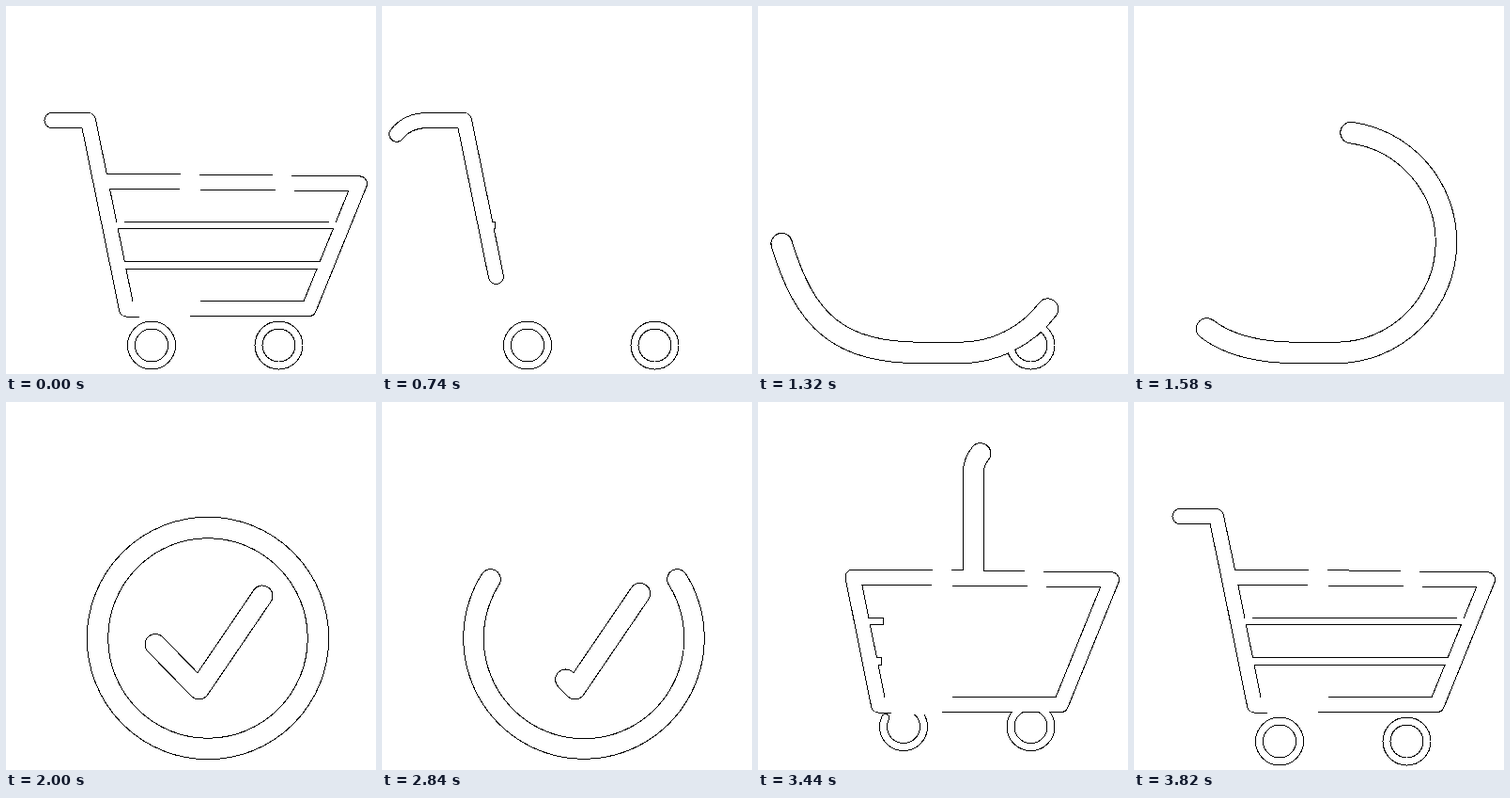
An HTML page that plays this animation: 394 px wide and 391 px high, repeating every 3840 ms.

```html
<!DOCTYPE html>
<html lang="en">
<head>
<meta charset="utf-8">
<title>Cart to check</title>
<style>
html, body { margin: 0; width: 100%; height: 100%; overflow: hidden; background: #fff; }
svg { display: block; width: 100vw; height: 100vh; }
path { fill: none; stroke-linejoin: round; stroke-linecap: round; }
#ink { stroke: #000; }
#body { stroke: #fff; }
#gaps rect { fill: #fff; }
</style>
</head>
<body>
<svg viewBox="0 0 394 391" shape-rendering="crispEdges">
  <g id="ink"></g>
  <g id="body"></g>
  <g id="gaps"></g>
</svg>
<script>
const NS = 'http://www.w3.org/2000/svg';
const LOOP = 3840;
const $ = id => document.getElementById(id);
const add = (parent, tag) => parent.appendChild(document.createElementNS(NS, tag));
const lerp = (a, b, k) => a + (b - a) * k;
const clamp = k => Math.max(0, Math.min(1, k));
const ramp = (t, a, b) => clamp((t - a) / (b - a));
const smooth = k => k * k * (3 - 2 * k);

function measure(d) {
  const p = document.createElementNS(NS, 'path');
  p.setAttribute('d', d);
  return p.getTotalLength();
}

// Monotone cubic through [time, value] keys, at rest at both ends.
function track(keys) {
  const n = keys.length - 1;
  const slope = i => (keys[i + 1][1] - keys[i][1]) / (keys[i + 1][0] - keys[i][0]);
  const tan = keys.map((k, i) => {
    if (i === 0 || i === n) return 0;
    const a = slope(i - 1), b = slope(i);
    return a * b > 0 ? 2 * a * b / (a + b) : 0;
  });
  return t => {
    if (t <= keys[0][0]) return keys[0][1];
    if (t >= keys[n][0]) return keys[n][1];
    let i = 0;
    while (t > keys[i + 1][0]) i++;
    const [t0, v0] = keys[i], [t1, v1] = keys[i + 1];
    const h = t1 - t0, u = (t - t0) / h, w = 1 - u;
    return v0 * (1 + 2 * u) * w * w + v1 * u * u * (3 - 2 * u)
      + h * u * w * (tan[i] * w - tan[i + 1] * u);
  };
}

// A tube is a dark stroke below a slightly thinner white one, so crossing tubes merge.
function tube(d) {
  const pair = [add($('ink'), 'path'), add($('body'), 'path')];
  const all = (k, v) => pair.forEach(p => p.setAttribute(k, v));
  if (d) all('d', d);
  return {
    pair,
    path: v => all('d', v),
    show: on => all('visibility', on ? 'visible' : 'hidden'),
    width(w) {
      pair[0].setAttribute('stroke-width', w + 1);
      pair[1].setAttribute('stroke-width', w - 1);
    },
    trim(a, b) {
      this.show(b - a > 0.2);
      all('stroke-dasharray', `${Math.max(b - a, 0.1)} 9999`);
      all('stroke-dashoffset', -a);
    }
  };
}

const TL = [101, 186.04], TR = [376.5, 188.82], BR = [322.5, 321.6], BL = [128.5, 322.1];

// Cart outline, handle, sweep below and the ring, as one line.
const cartPath = `M${TL} L${TR} L${BR} L${BL} L87.5 121.5 H49`;
const lipPath = cartPath + ' C33 121.5 23 127 16 136';
const sidePath = lipPath + ' C8 146 8 195 25 252';
const lowPath = sidePath + ' C50 335 85 368.5 175 368.5 H215';
const ringPath = lowPath + ' A117.5 117.5 0 0 0 215 133.5 A117.5 117.5 0 0 0 215 368.5';
const [hand, lip, side, low, full] = [cartPath, lipPath, sidePath, lowPath, ringPath].map(measure);
const edge = measure(`M${TL} L${TR} L${BR}`);
const base = measure(`M${TL} L${TR} L${BR} L${BL}`);

const snake = tube(ringPath);
const snakeHead = track([[560, hand], [740, lip], [1100, low - 113], [1320, low + 107],
  [1640, low + 408], [1990, full]]);
const snakeTail = track([[20, 0], [560, edge + 21], [740, base + 34.5], [1320, side],
  [1640, low - 121], [1990, low]]);

// The tick flies up, over and down into the basket.
const tickPath = 'M159 257.5 L205.5 305 L273 206';
const overPath = tickPath + ' C300 166 318 130 318 95 C318 55 290 41.5 268 41.5 C250 41.5 229 52 229 78';
const dropPath = overPath + ' V180';
const [tickLen, overLen, dropLen] = [tickPath, overPath, dropPath].map(measure);
const tick = tube(dropPath);
const tickDraw = track([[1620, 0], [1980, tickLen]]);
const tickHead = track([[2700, tickLen], [2840, tickLen + 3], [3220, dropLen - 50], [3440, dropLen + 70]]);
const tickTail = track([[2700, 0], [2840, 52], [3440, overLen - 26], [3660, dropLen]]);

const gripPath = `M229 187 L${TL} L87.5 121.5 H49`;
const gripLen = measure(gripPath);
const grip = tube(gripPath);
const gripHead = track([[3300, 0], [3440, 70], [3760, gripLen]]);

const bin = tube();
const lids = [tube(), tube()];

const bars = [
  { y: 232.75, x0: 112, out: [[20, 356], [560, 215], [740, 120], [770, 112]], back: [[3390, 113], [3440, 132], [3750, 356]] },
  { y: 275.5, x0: 120, out: [[20, 338], [540, 190], [700, 120]], back: [[3390, 119], [3440, 131], [3750, 338]] }
].map(b => {
  const line = tube();
  line.pair.forEach(p => p.style.strokeLinecap = 'butt');
  line.width(7.5);
  return { ...b, line, out: track(b.out), back: track(b.back) };
});

const R = 21.5;
const wheels = [
  { x: 155, gone: [1120, 1300], come: [3230, 3490] },
  { x: 290.5, gone: [1325, 1500], come: [3190, 3430] }
].map(w => {
  const line = tube(`M${w.x} ${360.5 - R} a${R} ${R} 0 0 1 0 ${2 * R} a${R} ${R} 0 0 1 0 ${-2 * R}`);
  line.width(8);
  return { ...w, line };
});
const around = 2 * Math.PI * R + 1;
const wheelLift = track([[3190, -26], [3440, -15.5], [3660, 0]]);

function gap(x0, x1, y, h) {
  const r = add($('gaps'), 'rect');
  Object.entries({ x: x0, y, width: x1 - x0, height: h }).forEach(([k, v]) => r.setAttribute(k, v));
  return r;
}
const rimGaps = [gap(186, 206, 177, 4), gap(284, 304, 178, 4), gap(185, 207, 193, 4),
  gap(287, 307, 194, 4), gap(142, 196, 328, 4), gap(135, 207, 312, 4)];
const barGaps = [gap(118, 126, 228, 3), gap(344, 351, 228, 3)];
const toggle = (list, on) => list.forEach(e => e.setAttribute('visibility', on ? 'visible' : 'hidden'));

// Point on the open basket: left side, floor, right side.
function binPoint(u) {
  const a = 0.29, b = 0.7;
  const mix = (p, q, k) => [lerp(p[0], q[0], k), lerp(p[1], q[1], k)];
  if (u < a) return mix(TL, BL, u / a);
  if (u < b) return mix(BL, BR, (u - a) / (b - a));
  return mix(BR, TR, (u - b) / (1 - b));
}

function drawBin(t) {
  const half = lerp(180, 122.2, Math.pow(ramp(t, 2690, 2840), 1.3)) * Math.PI / 180;
  const k = smooth(ramp(t, 2840, 3200));
  const pts = [];
  for (let i = 0; i <= 100; i++) {
    const u = i / 100, ang = Math.PI / 2 + half * (1 - 2 * u), q = binPoint(u);
    pts.push([lerp(215 + 117.5 * Math.cos(ang), q[0], k), lerp(251 + 117.5 * Math.sin(ang), q[1], k)]);
  }
  bin.path('M' + pts.map(p => p.map(v => v.toFixed(2)).join(' ')).join('L'));
  const w = lerp(lerp(22.5, 21.5, ramp(t, 2700, 2840)), 16, k);
  bin.width(w);
  const close = smooth(ramp(t, 2980, 3250)) / 2;
  lids.forEach((lid, i) => {
    const p = pts[i ? 100 : 0], q = pts[i ? 0 : 100];
    lid.path(`M${p} L${lerp(p[0], q[0], close)} ${lerp(p[1], q[1], close)}`);
    lid.width(w);
    lid.show(close > 0);
  });
}

function render(t) {
  const late = t >= 2700;

  if (late) snake.show(false);
  else {
    snake.width(lerp(16, 22.5, smooth(ramp(t, 760, 1250))));
    snake.trim(snakeTail(t), snakeHead(t));
  }

  bin.show(late);
  if (late) drawBin(t);
  else lids.forEach(lid => lid.show(false));

  tick.width(22);
  if (late) tick.trim(tickTail(t), Math.min(dropLen, tickHead(t)));
  else tick.trim(0, tickDraw(t));

  grip.width(16);
  grip.trim(0, gripHead(t));

  bars.forEach(b => {
    const x = late ? b.back(t) : b.out(t);
    b.line.show(late ? t > 3390 : x > b.x0);
    b.line.pair.forEach((p, i) => p.setAttribute('d', `M${b.x0 - 2} ${b.y} H${x + 1 - i}`));
  });

  wheels.forEach(w => {
    if (late) w.line.trim(0, around * ramp(t, ...w.come));
    else w.line.trim(around * ramp(t, ...w.gone), around);
    const dy = late ? wheelLift(t) : 0;
    w.line.pair.forEach(p => p.setAttribute('transform', `translate(0 ${dy})`));
  });

  toggle(rimGaps, t < 560 || t > 3260);
  toggle(barGaps, t < 40 || t > 3750);
}

function tickFrame() {
  render(performance.now() % LOOP);
  requestAnimationFrame(tickFrame);
}
tickFrame();
</script>
</body>
</html>
```
